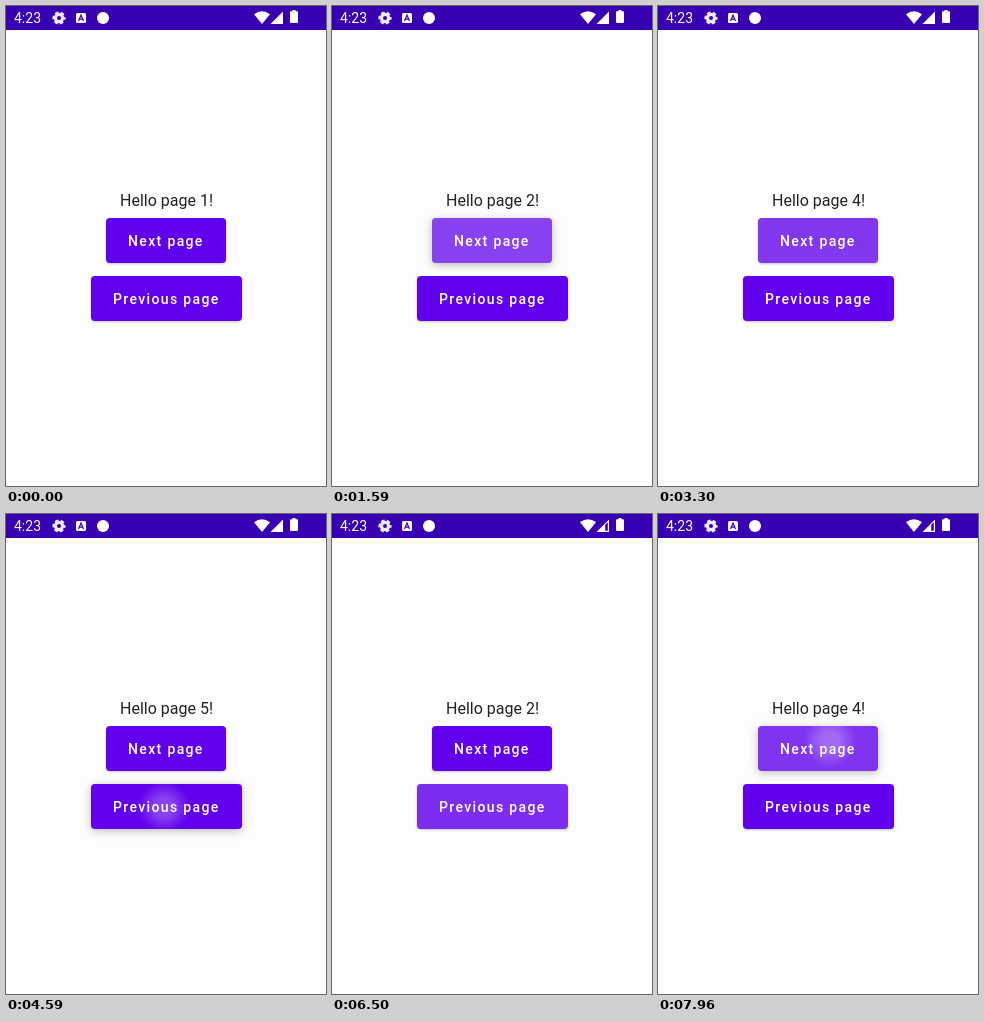
Recreate the animation shown at these times as an HTML page. Size 320x480 px, loop 8000 ms.

```html
<!DOCTYPE html>
<html lang="en">
<head>
<meta charset="utf-8">
<title>Pages</title>
<style>
  html, body { margin: 0; width: 100%; height: 100%; overflow: hidden; background: #fdfdfc; }
  svg { display: block; width: 100%; height: 100%; }
  text { font-family: Roboto, "Open Sans", sans-serif; }
  .label { font-size: 14px; font-weight: 500; letter-spacing: 1.35px; fill: #fff; }
</style>
</head>
<body>
<svg viewBox="0 0 320 480">
  <rect width="320" height="480" fill="#fdfdfc"/>
  <rect width="320" height="24" fill="#3700b3"/>
  <g fill="#fff">
    <text x="8" y="17" font-size="14">4:23</text>
    <g fill="none" stroke="#efeaf8">
      <circle cx="53" cy="12" r="3.6" stroke-width="3.2"/>
      <circle cx="53" cy="12" r="5.6" stroke-width="2" stroke-dasharray="3.6 2.264" stroke-dashoffset="1.8"/>
    </g>
    <rect x="70" y="7" width="10" height="10" rx="1.5"/>
    <path d="M72.5 15 75 9l2.5 6M73.4 13.2h3.2" fill="none" stroke="#3700b3" stroke-width="1.2"/>
    <circle cx="97" cy="12" r="6"/>
    <path d="M248 8.2Q256 2.2 264 8.2L256 18Z"/>
    <path d="M277 5.5V18H264.5Z"/>
    <path id="weak" d="M273.2 10.8 275.8 8.2V16.8H273.2Z" fill="#3700b3"/>
    <path d="M286.5 4h3v1.3h1.5q1 0 1 1V16q0 1-1 1h-6q-1 0-1-1V6.3q0-1 1-1h1.5Z"/>
  </g>
  <text id="hello" x="114" y="200" font-size="16" fill="#222"></text>
  <g id="buttons"></g>
</svg>
<script>
const LOOP = 8000, CLICK = 130, GROW = 250, HOLD = 450, LIFE = 830;
const buttons = [
  { label: "Next page", x: 100, y: 212, w: 120, step: 1, touch: [172, 227] },
  { label: "Previous page", x: 85, y: 270, w: 151, step: -1, touch: [158, 293] }
];
const taps = [
  [1340, 0], [2060, 0], [2790, 0], [3470, 0],
  [4500, 1], [5020, 1], [5930, 1],
  [7000, 0], [7430, 0], [7870, 0]
].map(([time, b], i) => ({ time, button: buttons[b], id: "tap" + i }));

const $ = id => document.getElementById(id);
const clamp = v => Math.max(0, Math.min(1, v));

const box = (b, attrs) => `<rect x="${b.x}" y="${b.y}" width="${b.w}" height="45" rx="4" ${attrs}/>`;

const ripple = ({ id, button: b }) =>
  `<radialGradient id="${id}" gradientUnits="userSpaceOnUse" cx="${b.touch[0]}" cy="${b.touch[1]}" r="1">
     <stop stop-color="#fff"/><stop offset="1" stop-color="#fff" stop-opacity="0"/>
   </radialGradient>` + box(b, `id="${id}-box" fill="url(#${id})"`);

$("buttons").innerHTML = buttons.map((b, i) =>
  box(b, `id="button${i}" fill="#6000ec"`) +
  taps.filter(tap => tap.button === b).map(ripple).join("") +
  `<text class="label" x="${b.x + 22}" y="${b.y + 28}">${b.label}</text>`).join("");

// Raised while pressed, then settles back
const lift = age => age < 0 ? 0 : clamp(age / 80) * clamp((380 - age) / 130);

function drawRipple(tap, age) {
  const shown = age > 0 && age < LIFE;
  $(tap.id + "-box").style.display = shown ? "" : "none";
  if (!shown) return;
  const q = clamp(age / GROW);
  const gradient = $(tap.id), inner = gradient.firstElementChild;
  gradient.setAttribute("r", 8 + 170 * q ** 2.2);
  inner.setAttribute("offset", q * 0.9);
  inner.setAttribute("stop-opacity", 0.26 * clamp((LIFE - age) / (LIFE - HOLD)));
}

function draw(t) {
  let page = 1;
  for (const tap of taps) {
    if (t >= tap.time + CLICK) page += tap.button.step;
    drawRipple(tap, t - tap.time);
  }
  $("hello").textContent = `Hello page ${page}!`;
  $("weak").style.display = t >= 6000 ? "" : "none";
  buttons.forEach((b, i) => {
    const up = Math.max(...taps.map(tap => tap.button === b ? lift(t - tap.time) : 0));
    $("button" + i).style.filter =
      `drop-shadow(0 ${1 + 1.5 * up}px ${1.2 + 3 * up}px rgba(20,20,10,${0.25 + 0.03 * up}))`;
  });
}

const start = performance.now();
function frame() {
  draw((performance.now() - start) % LOOP);
  requestAnimationFrame(frame);
}
frame();
</script>
</body>
</html>
```
